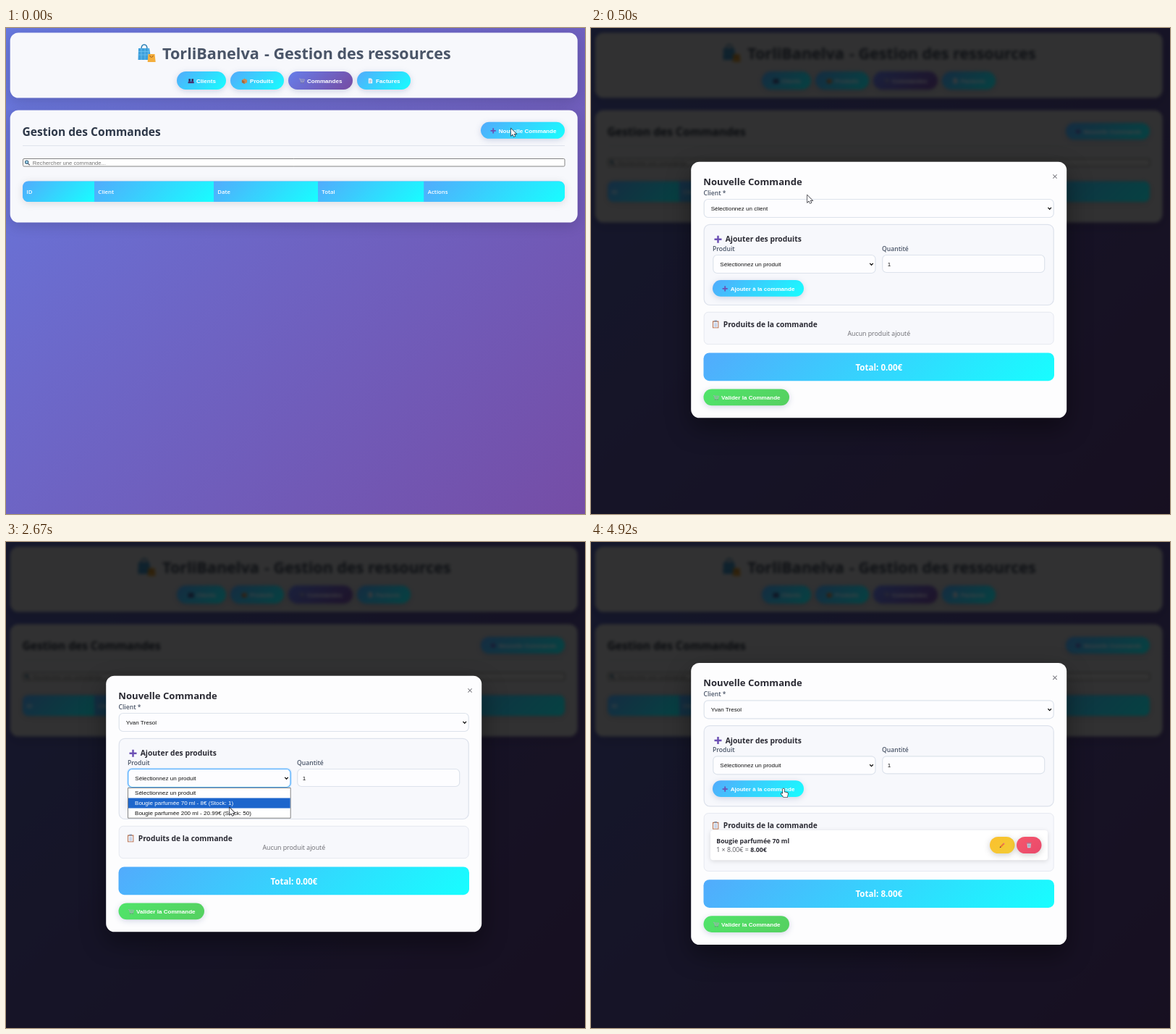
Write an HTML page with a canvas that moves like this. It is 800 by 671 pixels and loops after 5000 ms.

```html
<!DOCTYPE html>
<html lang="fr">
<head>
<meta charset="utf-8">
<title>Gestion des commandes</title>
<style>
html, body { margin: 0; height: 100%; overflow: hidden; background: #6a5fbd; }
canvas { display: block; }
</style>
</head>
<body>
<canvas id="stage" width="800" height="671"></canvas>
<script>
const W = 800, H = 671, LOOP = 5000, STEP = 1000 / 12;
const stage = document.getElementById('stage').getContext('2d');
const newLayer = () => Object.assign(document.createElement('canvas'), { width: W, height: H }).getContext('2d');
const paper = newLayer(), accents = newLayer(), veil = newLayer();
let g = stage; // context that the helpers draw on

const UI = '"Open Sans", sans-serif', ARIAL = '"Liberation Sans", Arial, sans-serif';
const BACKDROP = ['#6778de', '#754da6'];
const CYAN = ['#52abfc', '#17feff'], VIOLET = ['#667eea', '#764ba2'], GREEN = ['#50e46a', '#55d060'];
const CLIENTS = ['Sélectionnez un client', 'Yvan Tresol', 'Ninon Fabrel'];
const PRODUCTS = ['Sélectionnez un produit', 'Bougie parfumée 70 ml - 8€ (Stock: 1)',
  'Bougie parfumée 200 ml - 20.99€ (Stock: 50)'];

// Event times in ms
const OPEN = 200, FADE = 300, CLIENT = [1080, 1720], PRODUCT = [2330, 2960], ADDED = 4400;
const PATH = [[0, 698, 139], [180, 698, 139], [333, 562, 153], [500, 299, 231], [700, 235, 250], [1100, 235, 250],
  [1417, 243, 289], [1750, 243, 287], [2200, 300, 327], [2420, 300, 327], [2667, 309, 367], [3000, 309, 365],
  [3600, 288, 356], [4083, 270, 357], [4350, 266, 341], [LOOP, 266, 340]];

const ARROW = new Path2D('M0 0v9.6l2.2-2 1.5 3.3 1.6-.7-1.4-3.2h3z');
const HAND = new Path2D('M-1 1q1-1.6 2 0v4l4 .8q1.2.4 1 1.7l-.8 4.5h-5l-3.4-4.2q-.2-1.6 1.4-.8l.8.7z');

// 135 degree CSS gradient over a box
function diagonal(x, y, w, h, [from, to]) {
  const cx = x + w / 2, cy = y + h / 2, d = (w + h) / 4;
  const fill = g.createLinearGradient(cx - d, cy - d, cx + d, cy + d);
  fill.addColorStop(0, from);
  fill.addColorStop(1, to);
  return fill;
}

function box(x, y, w, h, r, fill, { line, width = 1, shadow, blur = 8, drop = 2 } = {}) {
  g.save();
  g.beginPath();
  g.roundRect(x, y, w, h, r);
  if (shadow) Object.assign(g, { shadowColor: shadow, shadowBlur: blur, shadowOffsetY: drop });
  g.fillStyle = Array.isArray(fill) ? diagonal(x, y, w, h, fill) : fill;
  g.fill();
  g.shadowColor = 'transparent';
  if (line) {
    g.strokeStyle = line;
    g.lineWidth = width;
    g.stroke();
  }
  g.restore();
}

function text(str, x, y, size, color, weight = 400, family = UI, align = 'left') {
  g.font = `${weight} ${size}px ${family}`;
  g.fillStyle = color;
  g.textAlign = align;
  g.fillText(str, x, y);
}

const arial = (str, x, y, color = '#111', size = 8.07, weight = 400) => text(str, x, y, size, color, weight, ARIAL);

function stroke(d, color, width = 1) {
  g.strokeStyle = color;
  g.lineWidth = width;
  g.stroke(new Path2D(d));
}

function shape(d, color) {
  g.fillStyle = color;
  g.fill(new Path2D(d));
}

// Small pictograms, centred on the origin
const icons = {
  plus: () => stroke('M-4 0h8M0-4v8', '#6c50b4', 2),
  people: () => {
    shape('M-4.5 3.5q0-3.5 2.5-3.5t2.5 3.5zM-.2 3.5q0-3.5 2.5-3.5t2.5 3.5z', '#46306e');
    shape('M-3.5-3h3v3h-3zM.9-3h3v3h-3z', '#35285a');
  },
  parcel: () => {
    shape('M-4-1.5l4-2.2 4 2.2v4l-4 2-4-2z', '#c98a55');
    shape('M-4-1.5l4 2v4l-4-2z', '#a5683b');
  },
  cart: () => {
    stroke('M-4-3.2h1.5l1.4 4.7h4.3l1.2-3.7h-6.2M-1.6 0h5', '#a9aabd', .9);
    shape('M-1.5 2.4h1.4v1.4h-1.4zM2 2.4h1.4v1.4h-1.4z', '#77788c');
  },
  sheet: () => {
    shape('M-3-4h4l2 2v6h-6z', '#eef1f7');
    stroke('M-1.8-1h3.5M-1.8.7h3.5M-1.8 2.4h2.5', '#8e9db5', .7);
  },
  lens: () => {
    stroke('M.8 1l3 2.8', '#5b5b66', 1.5);
    g.beginPath();
    g.arc(-1, -1, 2.5, 0, 7);
    g.fillStyle = '#9fdcf8';
    g.fill();
    g.strokeStyle = '#4a6d86';
    g.stroke();
  },
  clipboard: () => {
    shape('M-4.2-4.5h8.4v9.8h-8.4z', '#b9714e');
    shape('M-3.2-3.2h6.4v7.6h-6.4z', '#f1f3fa');
    shape('M-1.8-5.4h3.6v2.2h-3.6z', '#8c93a6');
    stroke('M-2-.9h4M-2 .9h4M-2 2.7h4', '#8aa5cf', .7);
  },
  pencil: () => {
    stroke('M-2.6 2.6l5-5', '#ee7a36', 2.3);
    shape('M-4 4l.7-2.4 1.7 1.7z', '#664636');
    stroke('M2.1-2.1l1-1', '#e76b8e', 2.3);
  },
  bin: () => {
    shape('M-3-2.2h6l-.6 6.4h-4.8z', '#c4d1df');
    stroke('M-3.8-3h7.6M-1-1v4M1-1v4', '#7f91a7', .9);
  },
  bags: () => {
    stroke('M-7-6q0-6 4-6t4 6', '#2b7fb5', 1.5);
    shape('M-11-7h15l2.5 16h-18z', '#3d9fdc');
    stroke('M-11-2.5h16M-11.4 2h17M-7-7v16M-2-7v16M2.5-7v16', '#70c3ef', .8);
    shape('M2.5 1h9l1.2 11h-11z', '#f4ae3d');
    stroke('M4.5 3q2.5 5 5 0', '#a96621', 1.1);
  }
};

function icon(name, x, y, scale = 1) {
  g.save();
  g.translate(x, y);
  g.scale(scale, scale);
  icons[name]();
  g.restore();
}

function pill(label, iconName, x, y, w, h, fill, labelX) {
  box(x, y, w, h, h / 2, fill, { shadow: 'rgba(40,60,130,.2)' });
  icon(iconName, labelX - 7.5, y + h / 2 + .5, .9);
  arial(label, labelX, y + h / 2 + 3.2, '#fff', 8.07, 700);
}

function drawPaper() {
  const card = { shadow: 'rgba(0,0,0,.14)', blur: 18, drop: 5 };
  box(5.7, 6.5, 784, 90, 11.5, '#f7f8fc', card);
  box(5.7, 113.5, 784, 155, 11.5, '#f7f8fc', card);
  icon('bags', 194, 35);
  text('TorliBanelva', 216, 42.7, 21.6, '#4a5568', 700);
  text('- Gestion des ressources', 357, 42.7, 21.5, '#4a5568', 700);
  text('Gestion des Commandes', 22.5, 149.3, 15.6, '#2d3748', 700);
  box(23, 162, 749, 1, 0, '#dfe3ec');
  box(23.5, 180.5, 748.5, 10.5, 1.5, '#fff', { line: '#767676', width: .9 });
  icon('lens', 29.5, 186, .85);
  arial('Rechercher une commande...', 36.8, 188.6, '#757575', 7.68);
}

function drawAccents(hover) {
  pill('Clients', 'people', 236, 60, 68, 25, CYAN, 263);
  pill('Produits', 'parcel', 310, 60, 74, 25, CYAN, 337);
  pill('Commandes', 'cart', 390, 60, 89, 25, VIOLET, 416);
  pill('Factures', 'sheet', 485, 60, 74, 25, CYAN, 511);
  pill('Nouvelle Commande', 'plus', 656, hover ? 129.8 : 131, 116, 23, CYAN, 680.7);

  box(23, 211.5, 749, 28.5, 8, CYAN[0], { shadow: 'rgba(0,0,0,.12)', blur: 12 });
  g.save();
  g.beginPath();
  g.roundRect(23, 211.5, 749, 28.5, 8);
  g.clip();
  const edges = [23, 122, 287, 431, 577.5, 772];
  ['ID', 'Client', 'Date', 'Total', 'Actions'].forEach((title, i) => {
    box(edges[i], 211.5, edges[i + 1] - edges[i], 28.5, 0, CYAN);
    text(title, edges[i] + 5.3, 229, 7.8, '#fff', 600);
  });
  g.restore();
}

function field(value, x, y, w, h, focused, chevron) {
  if (focused) box(x - 1.3, y - 1.3, w + 2.6, h + 2.6, 7, 'rgba(79,172,254,.28)');
  box(x + .5, y + .5, w - 1, h - 1, 5.5, '#fdfdff', { line: focused ? '#4facfe' : '#dde3ec', width: 1.2 });
  arial(value, x + (chevron ? 10 : 7.5), y + h / 2 + 3);
  if (chevron) {
    const cx = x + w - 6, cy = y + h / 2;
    stroke(`M${cx - 2.3} ${cy - 1.1}l2.3 2.4 2.3-2.4`, '#111', 1.3);
  }
}

function dropdown(options, x, y, w, pointerY) {
  const row = 13.9, picked = Math.max(0, Math.min(2, Math.floor((pointerY - y - .5) / 14)));
  box(x + .5, y + .5, w - 1, row * 3, 0, '#fff', { line: '#767676', width: .9 });
  options.forEach((option, i) => {
    if (i === picked) box(x + 1, y + .6 + i * row, w - 2, row, 0, '#1d66cc');
    arial(option, x + 10, y + 10.3 + i * row, i === picked ? '#fff' : '#111');
  });
}

function drawDialog(t, pointerY) {
  const added = t >= ADDED, grow = added ? 35.4 : 0;
  const within = ([from, to]) => t >= from && t < to;
  const hover = t >= 3700;

  box(138.2, 184.7, 519, 353.6 + grow, 11.5, '#fdfdfe', { shadow: 'rgba(0,0,0,.4)', blur: 34, drop: 14 });
  text('Nouvelle Commande', 155.3, 217, 13.1, '#2a2a33', 700);
  stroke('M638.3 202.3l5.4 5.4m0-5.4l-5.4 5.4', '#85858b', 1.1);
  text('Client *', 155.5, 230.7, 8.6, '#4a5568', 600);
  field(CLIENTS[t < CLIENT[1] ? 0 : 1], 155.7, 236, 484, 26, t >= CLIENT[0] && t < PRODUCT[0], true);

  box(156.2, 271.3, 483, 111.2, 8, '#f7f8fc', { line: '#dde2ec', width: 1.2 });
  icon('plus', 175.5, 291.7, 1.25);
  text('Ajouter des produits', 185.7, 295.3, 10.3, '#2a2a33', 700);
  text('Produit', 168, 308, 8.6, '#4a5568', 600);
  text('Quantité', 402, 308, 8.6, '#4a5568', 600);
  field(PRODUCTS[t >= PRODUCT[1] && !added ? 1 : 0], 168.3, 313, 225.2, 26, t >= PRODUCT[0] && !added, true);
  field('1', 402.2, 313, 225, 25);
  pill('Ajouter à la commande', 'plus', 168, hover ? 347 : 348.1, 126, 22.7, CYAN, 192.7);

  box(156.2, 392.3, 483, 44.4 + grow, 6, '#f7f8fc', { line: '#e6e9f1' });
  icon('clipboard', 172.2, 409);
  text('Produits de la commande', 182.7, 412.8, 10.25, '#2a2a33', 700);
  if (added) drawOrderLine();
  else text('Aucun produit ajouté', 397.8, 425.4, 8.8, '#6a6a70', 400, UI, 'center');

  box(155.5, 448.5 + grow, 484.5, 38.7, 8, CYAN);
  text(added ? 'Total: 8.00€' : 'Total: 0.00€', 397.8, 472.5 + grow, 11.6, '#fff', 700, UI, 'center');
  pill('Valider la Commande', 'cart', 155.5, 498.5 + grow, 118.5, 22.7, GREEN, 180);

  if (within(CLIENT)) dropdown(CLIENTS, 155.5, 262, 484.5, pointerY);
  if (within(PRODUCT)) dropdown(PRODUCTS, 168, 339, 225.7, pointerY);
}

function drawOrderLine() {
  box(165, 415.7, 466, 41.3, 4, '#fff', { shadow: 'rgba(0,0,0,.13)', blur: 6, drop: 1.5 });
  text('Bougie parfumée 70 ml', 173.3, 433.6, 8.75, '#2a2a33', 700);
  const sum = '1 × 8.00€ = ';
  text(sum, 173.3, 446, 8.8, '#55555c');
  text('8.00€', 173.3 + g.measureText(sum).width, 446, 8.8, '#2a2a33', 700);
  box(551, 424.7, 34.5, 23, 11.5, ['#fbc02d', '#f2cc35'], { shadow: 'rgba(0,0,0,.2)' });
  icon('pencil', 568.2, 436.4, .9);
  box(588, 424.7, 34.5, 23, 11.5, ['#f5576c', '#e9496b'], { shadow: 'rgba(0,0,0,.2)' });
  icon('bin', 605.2, 436.2, .9);
}

function pointerAt(t) {
  const i = PATH.findIndex(([time]) => time > t);
  const [t0, x0, y0] = PATH[i - 1], [t1, x1, y1] = PATH[i];
  const k = (t - t0) / (t1 - t0);
  return [x0 + (x1 - x0) * k, y0 + (y1 - y0) * k];
}

function drawPointer(x, y, hand) {
  const path = hand ? HAND : ARROW;
  g.save();
  g.translate(x, y);
  g.strokeStyle = '#1c1c24';
  g.lineWidth = 1.3;
  g.stroke(path);
  g.fillStyle = '#fff';
  g.fill(path);
  g.restore();
}

function onLayer(layer, paint) {
  g = layer;
  g.clearRect(0, 0, W, H);
  paint();
  g = stage;
}

function drawPage() {
  box(0, 0, W, H, 0, BACKDROP);
  g.drawImage(paper.canvas, 0, 0);
  g.drawImage(accents.canvas, 0, 0);
}

// Blurred dark page with the dialog on top, faded in as one group
function drawVeil(t, pointerY, offset) {
  box(0, 0, W, H, 0, BACKDROP);
  box(0, 0, W, H, 0, 'rgba(0,0,0,.8)');
  for (const [layer, light] of [[paper, .2], [accents, .26]]) {
    g.filter = `blur(2px) brightness(${light})`;
    g.drawImage(layer.canvas, 0, 0);
  }
  g.filter = 'none';
  g.save();
  g.translate(0, offset);
  drawDialog(t, pointerY);
  g.restore();
}

function render(t) {
  const [x, y] = pointerAt(t);
  const linear = Math.min(1, Math.max(0, (t - OPEN) / FADE));
  const shown = 1 - (1 - linear) ** 2;

  onLayer(accents, () => drawAccents(t < OPEN));
  drawPage();
  if (shown) {
    const offset = 11.5 * (1 - shown) - (t >= ADDED ? 17.7 : 0);
    onLayer(veil, () => drawVeil(t, y, offset));
    g.globalAlpha = shown;
    g.drawImage(veil.canvas, 0, 0);
    g.globalAlpha = 1;
  }
  drawPointer(x, y, t >= 4200);
}

onLayer(paper, drawPaper);
const start = performance.now();
function tick() {
  const t = (performance.now() - start) % LOOP;
  render(Math.min(59, Math.floor((t + 4) / STEP)) * STEP);
  requestAnimationFrame(tick);
}
tick();
</script>
</body>
</html>
```
